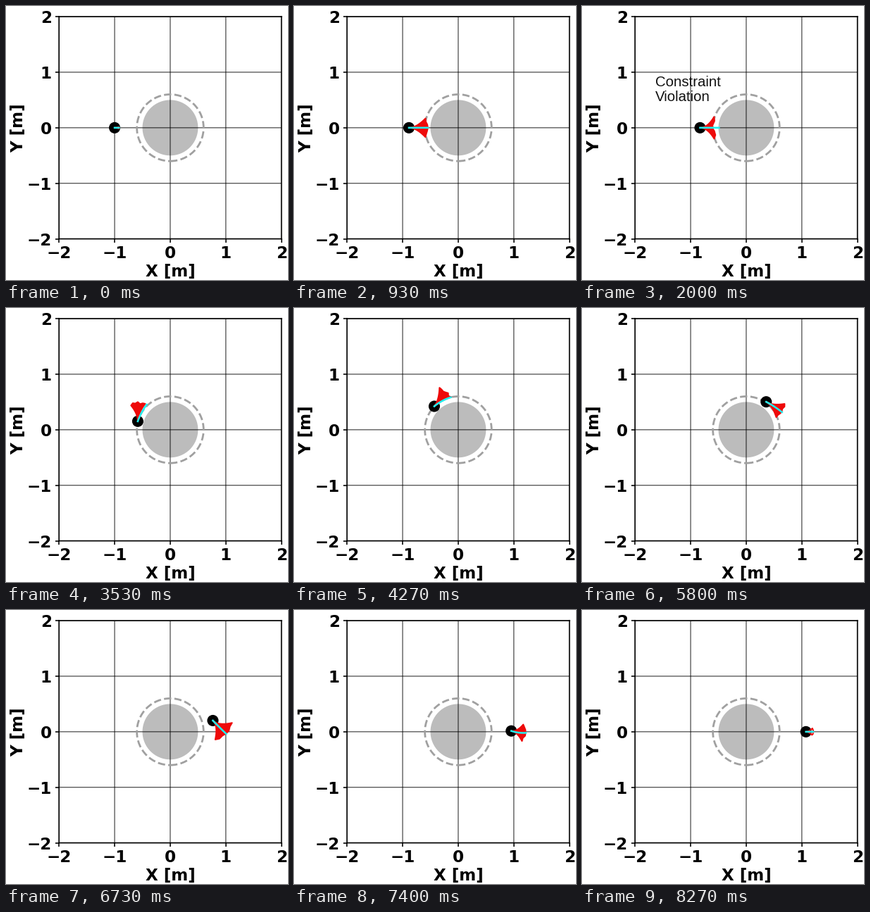
A matplotlib script that plays this animation: 400 by 389 pixels, repeating every 8340 ms.

```python
import numpy as np
import matplotlib.pyplot as plt
from matplotlib.animation import FuncAnimation
from matplotlib.patches import Circle, Polygon

W, H, DPI = 400, 389, 100
PT = 72 / DPI                           # points per pixel
LEFT, TOP, SIDE = 75.2, 15.1, 315.5     # plot area in pixels
MID_X, MID_Y = LEFT + SIDE / 2, TOP + SIDE / 2

FRAMES, INTERVAL = 278, 30
STEP, STEPS = 1000 / 15, 125            # the simulation runs at 15 Hz
HOLDS = ((22, 25), (30, 33), (36, 41))  # steps where it pauses
STOP, RESUME, HUG, LEAVE, ARRIVE, END = 1400, 2670, 3530, 5500, 7600, 8340

RED, CYAN = "#ee0a0a", "#22eeee"


def ease(t, start, stop):
    """Smooth step from 0 to 1."""
    u = np.clip((t - start) / (stop - start), 0, 1)
    return u * u * (3 - 2 * u)


def polar(r, angle):
    return np.stack([r * np.cos(angle), r * np.sin(angle)], axis=-1)


def robot_at(t):
    """Stop short of the obstacle, follow its margin, then head for the goal."""
    r = (1 - 0.17 * np.clip(t / STOP, 0, 1) - 0.227 * ease(t, RESUME, HUG)
         + 0.472 * ease(t, LEAVE, END))
    return polar(r, np.pi * (1 - ease(t, RESUME, ARRIVE)))


def heading(t, ahead):
    """Direction towards the position some time ahead; straight at first."""
    move = robot_at(t + ahead) - robot_at(t)
    turn = ease(t, RESUME - 100, RESUME + 300)
    dx, dy = turn * move + np.array((0.02 * (1 - turn) + 0.002, 0))
    return np.arctan2(dy, dx)


def reach_at(t):
    return 0.08 + 0.26 * ease(t, 0, 870) - 0.21 * ease(t, 6800, 8270)


def bezier(ctrl, end, n=12):
    """Quadratic curve starting at the robot."""
    s = np.linspace(0, 1, n)[:, None]
    return 2 * s * (1 - s) * ctrl + s ** 2 * end


def plan_at(t):
    reach = reach_at(t)
    return bezier(polar(reach / 2, heading(t, 200)),
                  polar(reach, heading(t, 650)))


def fan_at(t, seed):
    """Outline of all sampled rollouts."""
    reach = reach_at(t)
    hug = ease(t, RESUME, HUG) * (1 - ease(t, LEAVE, 6700))
    half = np.radians(10 + 28 * ease(t, 0, 1470) - 15 * hug
                      - 10 * ease(t, 7000, END))
    lean = np.radians(28) * ease(t, RESUME, HUG) * (1 - ease(t, HUG, 6200))
    fork = 0.35 * ease(t, 870, 1470) * (1 - ease(t, RESUME, 3000))

    aim = heading(t, 650) + lean
    u = np.linspace(1, -1, 7)
    rough = np.random.default_rng(seed).uniform(-0.06, 0.06, u.size)
    edge = polar(reach * (0.97 - fork * (1 - abs(u)) + rough), aim + half * u)
    neck = polar(0.4 * reach, aim)
    return np.vstack([bezier(neck, edge[0]), edge[1:-1],
                      bezier(neck, edge[-1])[::-1]])


plt.rcParams.update({"font.family": "DejaVu Sans", "font.weight": "bold",
                     "font.size": 23 * PT, "path.snap": False})
fig = plt.figure(figsize=(W / DPI, H / DPI), dpi=DPI, facecolor="white")
ax = fig.add_axes([LEFT / W, 1 - (TOP + SIDE) / H, SIDE / W, SIDE / H])
ax.set(xlim=(-2, 2), ylim=(-2, 2), xticks=range(-2, 3), yticks=range(-2, 3))
ax.grid(color="black", lw=1.1 * PT, alpha=0.8)
ax.tick_params(width=1.6 * PT, length=3.5, pad=3)
ax.tick_params(axis="y", pad=4)
for spine in ax.spines.values():
    spine.set_linewidth(1.7 * PT)

fig.text(MID_X / W, 1 - 384 / H, "X [m]", ha="center", va="baseline")
fig.text(24 / W, 1 - MID_Y / H, "Y [m]", rotation=90,
         rotation_mode="anchor", ha="center", va="baseline")

ax.add_patch(Circle((0, 0), 0.5, fc="#bcbcbc", ec="none", zorder=0.5))
ax.add_patch(Circle((0, 0), 0.6, fill=False, ec="#a0a0a0", lw=2, ls="--",
                    zorder=2))

robot = ax.add_patch(Circle((-1, 0), 0.102, fc="black", ec="none", zorder=3))
fan = ax.add_patch(Polygon(np.zeros((3, 2)), fc=RED, ec=RED, lw=2 * PT,
                           joinstyle="round", zorder=4))
plan, = ax.plot([], [], color=CYAN, lw=2.6 * PT, zorder=5)
note = [fig.text(104 / W, 1 - y / H, word, family="Liberation Sans",
                 weight="normal", size=20.4 * PT, color="#111111",
                 va="baseline")
        for word, y in (("Constraint", 114), ("Violation", 135.5))]


def draw(i):
    step = min(int((i + 1) * INTERVAL / STEP), STEPS - 1)
    shown = next((a for a, b in HOLDS if a <= step < b), step)
    t = shown * STEP
    pos = robot_at(t)

    robot.center = pos
    fan.set_xy(pos + fan_at(t, shown))
    fan.set_fill(t < 8000)              # the last rollouts are an open loop
    plan.set_data(*(pos + plan_at(t)).T)
    for word in note:
        word.set_visible(STOP - 100 < step * STEP < RESUME + 50)
    return [robot, fan, plan, *note]


anim = FuncAnimation(fig, draw, frames=FRAMES, interval=INTERVAL,
                     repeat=True, repeat_delay=0, blit=False)
plt.show()
```
